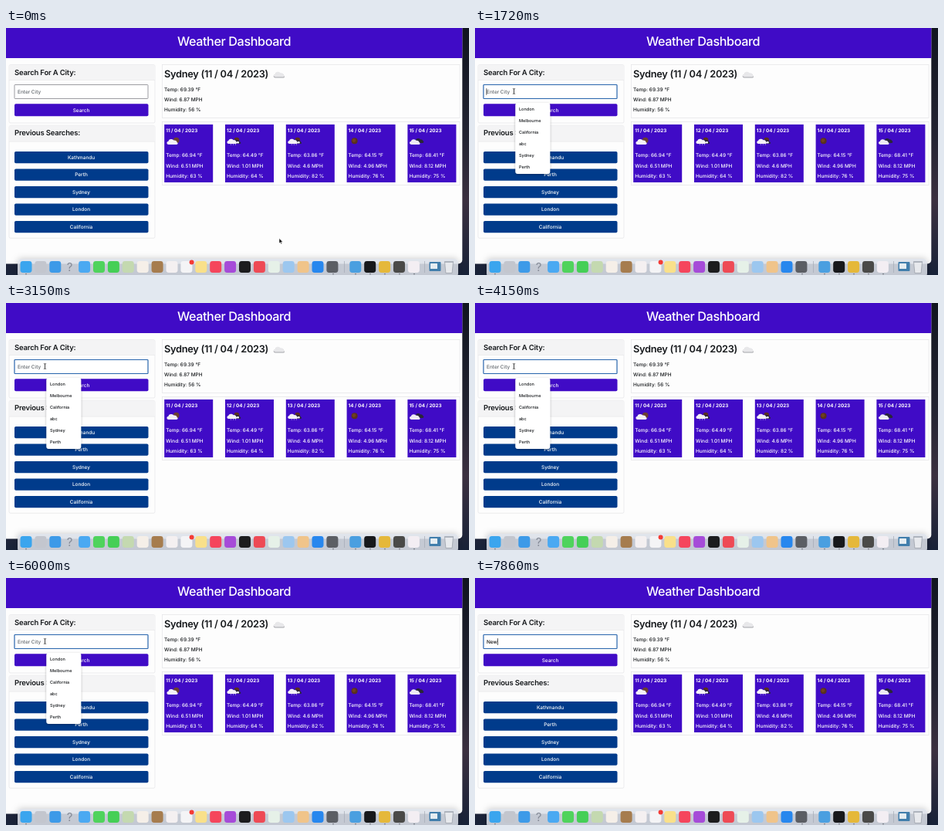
These frames come from a looping animation (600x320 px, 8 s). An HTML page:

```html
<!DOCTYPE html>
<html lang="en">
<head>
<meta charset="utf-8">
<title>Weather Dashboard</title>
<style>
html, body { margin: 0; width: 100%; height: 100%; overflow: hidden; background: #121a29; }
svg { display: block; width: 600px; height: 320px; font: 500 6.45px Inter, "Open Sans", sans-serif;
  text-rendering: geometricPrecision; }
text { white-space: pre; }
.head { font-size: 9.5px; font-weight: 600; letter-spacing: -.02em; }
</style>
</head>
<body>
<svg id="stage" viewBox="0 0 600 320"></svg>
<script>
const INDIGO = '#400bc6', NAVY = '#003b8b', INK = '#15181b', LINE = '#e4e4e7';
const LOOP = 8000, STEP = 142.9;
const FOCUS = 1286, MENU = 1429, KEYS = [6430, 7288, 7573];

const rect = (x, y, w, h, fill, r = 0, more = '') =>
  `<rect x="${x}" y="${y}" width="${w}" height="${h}" rx="${r}" fill="${fill}" ${more}/>`;
const circle = (x, y, r, fill) => `<circle cx="${x}" cy="${y}" r="${r}" fill="${fill}"/>`;
const text = (x, y, s, fill = INK, more = '') => `<text x="${x}" y="${y}" fill="${fill}" ${more}>${s}</text>`;
const outline = `stroke="${LINE}" stroke-width=".7"`;
const button = (y, h, label, fill) => rect(11, y, 173.5, h, fill, 1.8) +
  text(97.5, y + h / 2 + 2.3, label, '#fff', 'text-anchor="middle"');

// A cloud whose flat base is centred on x, y
const cloud = (x, y, s, fill) => `<path transform="translate(${x} ${y}) scale(${s} ${s * .82})" fill="${fill}"
  d="M-5 0a2.7 2.7 0 0 1-.3-5.3a3.8 3.8 0 0 1 7.1-1.3a3 3 0 0 1 4 2.8a2 2 0 0 1-.4 3.8z"/>`;

function panel(y, h, headH, title) {
  return rect(4, y, 189, h, '#fdfdfd', 2, outline) + rect(4.3, y + .3, 188.4, headH, '#f4f4f5', 1.5) +
    rect(4, y + headH, 189, .6, LINE) + text(11, y + 13, title, INK, 'class="head"');
}

function weather(kind, x) {
  const y = 151;
  if (kind === 'clear') return circle(x + 10, 146.3, 4, '#59301f') + circle(x + 9.3, 145.6, 2.4, '#70401f');
  if (kind === 'broken') return cloud(x + 15, y - 2, .85, '#292638') + cloud(x + 9.5, y, .95, '#eeeaf4');
  if (kind === 'rain') return circle(x + 15, 145, 3.3, '#59301f') + cloud(x + 15, y - 1, .75, '#292638') +
    cloud(x + 9, y - 1, .9, '#f3f0f7') + rect(x + 15, y - 4, 3, 2.4, '#f3f0f7', 1) +
    [7, 10, 13].map(d => rect(x + d, y - 1, .8, 1.7, '#c9c3e6', .4)).join('');
  return circle(x + 15.5, 145.5, 3.8, '#6b4030') + cloud(x + 10.5, y, 1, '#f3f0f7');
}

const forecast = [
  [11, 'partly', '66.94', '6.51', 63],
  [12, 'rain', '64.49', '1.01', 64],
  [13, 'rain', '63.86', '4.6', 82],
  [14, 'clear', '64.15', '4.96', 76],
  [15, 'broken', '68.41', '8.12', 75]
];

function dayCard([day, kind, temp, wind, hum], i) {
  const x = 205.2 + 78.8 * i, tx = x + 2;
  return rect(x, 125, 63, 75, INDIGO) +
    text(tx, 134.6, `${day} / 04 / 2023`, '#fff', 'font-weight="700" font-size="6.3"') +
    weather(kind, x) +
    text(tx, 167.3, `Temp: ${temp} °F`, '#fff') +
    text(tx, 180.6, `Wind: ${wind} MPH`, '#fff') +
    text(tx, 194, `Humidity: ${hum} %`, '#fff');
}

function dock() {
  const apps = ['#3aa5ee', '#c3c6ce', '#3d9ae8', '', '#4aa9f2', '#4fd35c', '#45cf56', '#c4d9b0', '#f5efe8',
    '#a67c4e', '#f4f0f1', '#f4f4f6', '#f9e08a', '#f5455c', '#a64bd8', '#1c1c1e', '#ee4a55',
    '#e6f1e8', '#9cc7ef', '#f0c48a', '#2787ee', '#5b5e64', '#4a9fe0', '#17181b', '#e5b83a', '#4a4a48', '#f3eef3'];
  let out = rect(15, 299, 571, 24, '#dfe3ec', 5, 'fill-opacity=".85" filter="url(#glow)"');
  apps.forEach((fill, i) => {
    const x = 26 + 18.9 * i + (i > 21 ? 11 : 0);
    out += fill ? rect(x - 7.5, 302, 15, 15, fill, 3.4)
      : text(x, 315.3, '?', '#858b97', 'font-size="15" font-weight="400" text-anchor="middle"');
  });
  for (const x of [438, 542]) out += rect(x, 302, .7, 15, '#a4a9b5');
  for (const x of [26, 424, 453, 472, 491, 510, 529]) out += circle(x, 318.7, .6, '#30343c');
  return out + circle(240.6, 303.6, 3, '#f43b35') +
    rect(548.5, 303, 15, 12, '#417eac', 1) + rect(550, 305, 9, 7, '#e5edf2', .5) +
    `<path d="M568.5 303h11l-1.4 14.5h-8.2z" fill="#e7e9ed" stroke="#949aa4" stroke-width=".7"/>` +
    rect(567.8, 302.2, 12.4, 1.6, '#a7adb6', .8);
}

const menu = ['London', 'Melbourne', 'California', 'abc', 'Sydney', 'Perth'];
const cities = ['Kathmandu', 'Perth', 'Sydney', 'London', 'California'];

stage.innerHTML = `<defs>
    <linearGradient id="desk" x2="0" y2="1"><stop stop-color="#10141f"/><stop offset=".45" stop-color="#242533"/>
      <stop offset=".7" stop-color="#3b3040"/><stop offset="1" stop-color="#182238"/></linearGradient>
    <filter id="soft" x="-30%" y="-30%" width="160%" height="160%">
      <feDropShadow dx="0" dy="1" stdDeviation="1.6" flood-opacity=".3"/></filter>
    <filter id="glow" x="-5%" y="-80%" width="110%" height="260%">
      <feDropShadow dx="0" dy="0" stdDeviation="4" flood-opacity=".25"/></filter>
  </defs>` +
  rect(0, 0, 600, 320, 'url(#desk)') +
  '<path d="M0 0H591.3V300.5a5 5 0 0 1-5 5H0z" fill="#fdfdfd"/>' +
  rect(0, 0, 591.3, 39, INDIGO) +
  text(295.5, 23.3, 'Weather Dashboard', '#fff',
    'text-anchor="middle" font-size="16.2" letter-spacing="-.4"') +
  panel(47.5, 75.5, 19.5, 'Search For A City:') +
  rect(11, 73.5, 173, 18, '#fff', .8, 'id="field" stroke="#85858b" stroke-width=".8"') +
  text(15, 84.9, '', INK, 'id="entry"') +
  rect(15, 78.2, .7, 8.6, '#111', 0, 'id="caret"') +
  button(98.3, 16, 'Search', INDIGO) +
  panel(126.3, 146, 20.5, 'Previous Searches:') +
  cities.map((c, i) => button(160 + 22.5 * i, 15.3, c, NAVY)).join('') +
  rect(202.5, 47.5, 385.5, 69, '#fdfdfd', 0, outline) +
  text(205, 64, 'Sydney (11 / 04 / 2023)', INK, 'font-size="12.8" font-weight="600" letter-spacing="-.3"') +
  cloud(354, 64.6, 1, '#a4a5aa') + cloud(354, 63.6, .97, '#e8e8ea') +
  text(205, 81.6, 'Temp: 69.39 °F') + text(205, 95, 'Wind: 6.87 MPH') + text(205, 108.4, 'Humidity: 56 %') +
  rect(202.5, 121.5, 385.5, 82, '#fdfdfd', 0, outline) +
  forecast.map(dayCard).join('') +
  `<g id="menu" font-size="5.5">${rect(52.3, 97, 45, 92, '#fff', 3, 'filter="url(#soft)"')}` +
  menu.map((m, i) => text(57, 107 + 15 * i, m)).join('') + '</g>' +
  dock() +
  `<path id="arrow" d="M0 0v6.6l1.5-1.4l1 2.3l1.1-.5l-1-2.2h2.1z" fill="#000" stroke="#fff" stroke-width=".6"/>
  <path id="beam" d="M-1.4-3.4q1.4 0 1.4.8v5.2q0 .8-1.4.8M1.4-3.4q-1.4 0-1.4.8M0 2.6q0 .8 1.4.8"
    fill="none" stroke="#111" stroke-width=".8"/>`;

const $ = id => document.getElementById(id);
const show = (id, on) => $(id).setAttribute('visibility', on ? 'visible' : 'hidden');
const place = (id, x, y) => $(id).setAttribute('transform', `translate(${x} ${y})`);

function draw(now) {
  const t = Math.floor(now % LOOP / STEP) * STEP;
  const typed = KEYS.filter(k => t >= k).length;
  const focused = t >= FOCUS;

  // Pointer glides up to the search field
  const p = Math.min(1, t / (STEP * 8)), e = p * p * (3 - 2 * p);
  const x = 354 - 303.5 * e, y = 272.5 - 190.5 * e;
  const inField = x > 11 && x < 184 && y > 73 && y < 92;
  place('arrow', x, y);
  place('beam', x, y);
  show('arrow', !typed && !inField);
  show('beam', !typed && inField);

  $('field').setAttribute('stroke', focused ? '#2865ad' : '#85858b');
  $('field').setAttribute('stroke-width', focused ? 1.2 : .8);
  $('entry').textContent = typed ? 'New'.slice(0, typed) : 'Enter City';
  $('entry').setAttribute('fill', typed ? '#111' : '#62686e');

  const since = t - (typed ? KEYS[typed - 1] : FOCUS);
  $('caret').setAttribute('x', typed ? 15.3 + $('entry').getComputedTextLength() : 14.6);
  show('caret', focused && since % 1000 < 500);
  show('menu', t >= MENU && !typed);
}

const start = performance.now();
function tick() {
  draw(performance.now() - start);
  requestAnimationFrame(tick);
}
tick();
</script>
</body>
</html>
```
